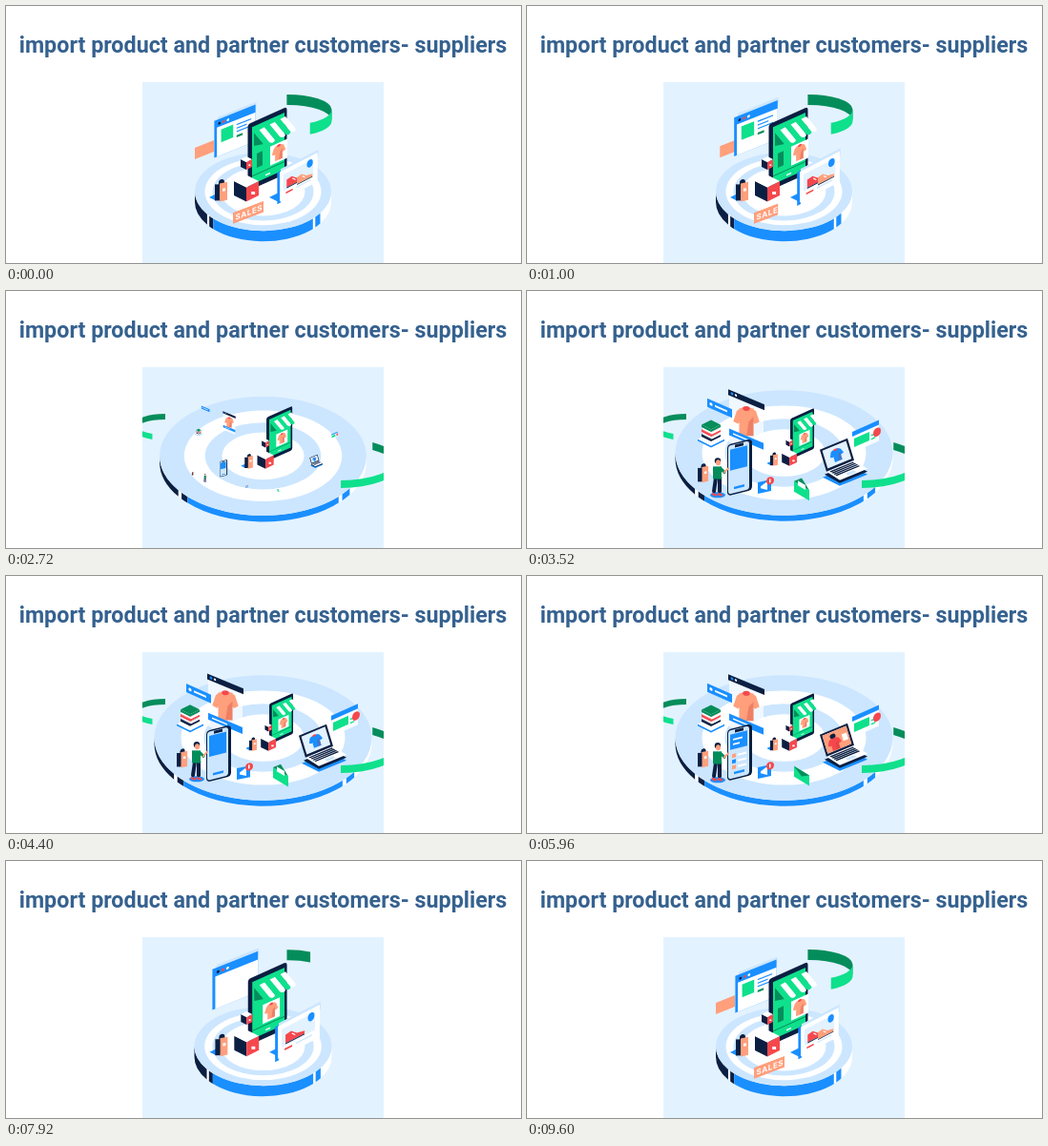
Animation of 540 by 270 pixels, one loop 9.64 s. Source, as an HTML page with a canvas:

```html
<!DOCTYPE html>
<html lang="en">
<head>
<meta charset="utf-8">
<style>
html, body { margin: 0; width: 540px; height: 270px; overflow: hidden; background: #fff; }
canvas { position: absolute; left: 0; top: 0; }
h1 { position: absolute; left: 0; top: 27px; width: 539px; margin: 0; text-align: center; white-space: nowrap;
  font: 700 23.3px/28px Roboto, sans-serif; color: #35618f; }
</style>
</head>
<body>
<canvas width="540" height="270"></canvas>
<h1>import product and partner customers- suppliers</h1>
<script>
const c = document.querySelector('canvas').getContext('2d');
const LOOP = 9640, RAD = Math.PI / 180;
const PALE = '#e3f2ff', RING = '#cce6ff', BLUE = '#1a8fff', NAVY = '#0b1f42', WHITE = '#fff',
  GREEN = '#0fe08c', DARK = '#048d5b', ORANGE = '#ff9f7c', RED = '#f5484d';
let t = 0;

const mix = (a, b, k) => a + (b - a) * k;
const part = (a, b) => Math.min(1, Math.max(0, (t - a) / (b - a)));
const ramp = (a, b) => {
  const k = part(a, b);
  return k < .5 ? 4 * k ** 3 : 1 - 4 * (1 - k) ** 3;
};
// Visible across the loop seam: appears late, leaves early
const seam = (inA, inB, outA, outB) => t < LOOP / 2 ? 1 - ramp(outA, outB) : ramp(inA, inB);
const bob = phase => Math.sin(t / LOOP * 8 * Math.PI + phase) * .7;

// Shapes
const rect = (color, x, y, w, h) => { c.fillStyle = color; c.fillRect(x, y, w, h); };
function round(color, w, h, r) {
  c.fillStyle = color;
  c.beginPath();
  c.roundRect(-w / 2, -h / 2, w, h, r);
  c.fill();
}
function poly(color, ...p) {
  c.fillStyle = color;
  c.beginPath();
  for (let i = 0; i < p.length; i += 2) c.lineTo(p[i], p[i + 1]);
  c.fill();
}
function oval(color, x, y, rx, ry = rx) {
  c.fillStyle = color;
  c.beginPath();
  c.ellipse(x, y, rx, ry, 0, 0, 7);
  c.fill();
}
function line(color, width, x1, y1, x2, y2) {
  c.strokeStyle = color;
  c.lineWidth = width;
  c.lineCap = 'round';
  c.beginPath();
  c.moveTo(x1, y1);
  c.lineTo(x2, y2);
  c.stroke();
}
function textRows(color, x, y, w, count, gap) {
  for (let i = 0; i < count; i++) rect(color, x, y + i * gap, w * (1 - i % 2 * .3), gap * .35);
}
// Vertical band along an elliptical arc, angles in degrees
function band(color, x, y, rx, ry, from, to, h) {
  if (to <= from) return;
  c.fillStyle = color;
  c.beginPath();
  c.ellipse(x, y, rx, ry, 0, from * RAD, to * RAD);
  c.ellipse(x, y + h, rx, ry, 0, to * RAD, from * RAD, true);
  c.fill();
}

// Spaces: a unit square spanned by two edges, and a sheared wall
function plane(x, y, ux, uy, vx, vy, draw) {
  c.save();
  c.transform(ux, uy, vx, vy, x, y);
  draw();
  c.restore();
}
const wall = (x, y, scale, slope, draw) => scale > .01 && plane(x, y, scale, scale * slope, 0, scale, draw);

function prism(x, y, w, h, top, left, right) {
  wall(x - w, y, 1, .5, () => rect(left, 0, 0, w, h));
  wall(x, y + w / 2, 1, -.5, () => rect(right, 0, 0, w, h));
  poly(top, x - w, y, x, y - w / 2, x + w, y, x, y + w / 2);
}
function tee(color, x, y, s) {
  wall(x, y, s, 0, () => {
    rect(color, -6, -11, 12, 23);
    for (const side of [-1, 1]) poly(color, side * 3, -12, side * 8, -9, side * 11, 0, side * 7, 2, 0, -6);
    poly('rgba(190,50,40,.28)', 2, 0, 6, -4, 6, 12, 0, 12);
    oval(RED, 0, -11, 3, 2);
  });
}
function shoe(color, x, y, s) {
  wall(x, y, s, 0, () => {
    poly(color, -10, -4, -4, -5, 2, 0, 10, 2, 10, 5, -10, 5);
    rect(NAVY, -10, 5, 20, 1);
    line(WHITE, 1, -3, -2, 0, 1);
  });
}
function crate(x, y, w, h) {
  prism(x, y, w, h, WHITE, NAVY, RED);
  rect(WHITE, x + w * .4, y + w * .5 + h * .3, w * .3, h * .2);
}
function bag(x, y, s) {
  wall(x, y, s, -.2, () => {
    round(NAVY, 6, 22, 3);
    rect(ORANGE, -2, -7, 8, 19);
    wall(-2, -7, 1, .2, () => rect(NAVY, -5, 1, 5, 17));
    rect(WHITE, 1, -1, 3, 3);
  });
}

function platform(z) {
  const cy = mix(195, 170, z), h = mix(11, 6, z), rx = mix(71.5, 114, z);
  const side = (color, a, b) => band(color, 269.5, cy, rx, rx * .577, a, b, h);
  side(WHITE, 0, 180);
  side(NAVY, 145, 180);
  side(NAVY, 137, 142);
  side(BLUE, 43, 137);
  side(BLUE, 33, 40);
  [rx, mix(61, 86, z), mix(53, 62, z), mix(44, 43, z)]
    .forEach((r, i) => oval(i % 2 ? WHITE : RING, 269.5, cy, r, r * .577));
}

function browser(size, shrink) {
  wall(240, 126 + 6 * shrink, size * (1 - .1 * shrink), -.4, () => {
    rect(RING, -20, -25, 45, 8);
    rect(BLUE, -24, -22, 48, 43);
    rect(WHITE, -21, -13, 45, 34);
    [NAVY, RED, WHITE].forEach((color, i) => oval(color, -18 + 5 * i, -17, 1.5));
    const k = seam(8050, 8600, 2000, 2400);
    rect(GREEN, -16, -9, 14 * k, 15 * k);
    textRows(BLUE, 2, -8, 17 * k, 3, 4);
    rect(DARK, 2, 5, 7 * k, 2.5);
  });
}

function shop() {
  const slide = seam(8050, 8600, 2000, 2400);
  wall(274, 150, 1, -.45, () => {
    round(NAVY, 41, 70, 3);
    rect(GREEN, -16, -30, 34, 60);
    rect(DARK, -16, 21, 34, 1);
    rect(WHITE, -2, 26, 5, 1.5);
    rect(DARK, -11, 0, 6 * slide, 15);
    wall(4 + 8 * slide, 9, 1, 0, () => {
      rect(WHITE, -9, -10, 18, 20);
      tee(ORANGE, 0, 0, .65);
    });
  });
  poly(DARK, 260, 133, 270, 145, 260, 147);
  plane(260, 133, 33, -17, 10, 12, () => {
    for (let i = 0; i < 6; i++) {
      const color = i % 2 ? WHITE : GREEN;
      rect(color, i / 6, 0, 1 / 6, 1);
      oval(color, (i + .5) / 6, 1, 1 / 12, .2);
    }
  });
}

function shoeCard(size, shrink) {
  wall(306, 180, size * (1 - .1 * shrink), -.52, () => {
    rect(RING, -20, -20, 44, 8);
    rect(BLUE, -24, -18, 4, 37);
    rect(WHITE, -21, -17, 44, 34);
    rect(PALE, -17, -12, 35, 19);
    oval(BLUE, 14, -9, 3.5, 4.5);
    const swap = t < LOOP / 2 ? ramp(900, 1500) : 0;
    shoe(RED, -3, 0, 1 - swap);
    shoe(ORANGE, 8, 3, .9 * mix(seam(7600, 8800, 2000, 2400), 1, swap));
    rect(RED, -14, 10, 8, 2);
    rect(RING, -2, 10, 17, 1.5);
  });
}

function curl() {
  const early = t < LOOP / 2;
  const head = mix(-92, 60, early ? 1 : ramp(7450, 8700));
  const tail = mix(-92, 60, early ? ramp(1300, 2480) : 0);
  band(DARK, 296, 109, 45.5, 16, tail, Math.min(head, 0), 11);
  band(GREEN, 296, 109, 45.5, 16, Math.max(tail, 0), head, 12);
}

function shopScene(z) {
  const size = seam(7150, 7750, 2000, 2550), shrink = seam(8150, 9300, 400, 1600);
  const flag = seam(8400, 9200, 700, 1500);
  c.save();
  c.translate(121.4 * z, 58.5 * z);
  c.scale(1 - .39 * z, 1 - .39 * z);
  wall(218, 141, 1, -.4, () => rect(ORANGE, -20 * flag, 0, 20 * flag, 12));
  browser(size, shrink);
  curl();
  shop();
  crate(252, 161, 6, 8);
  crate(252, 184, 13, 15);
  prism(220, 201, 7, 0, BLUE);
  bag(226, 193, 1);
  prism(285, 201, 9 * size, 0, BLUE);
  shoeCard(size, shrink);
  wall(238, 217, 1, -.38, () => {
    c.beginPath();
    c.rect(0, 0, 32 * flag, 12);
    c.clip();
    rect(ORANGE, 0, 0, 32, 12);
    c.fillStyle = WHITE;
    c.font = '700 8px Inter, sans-serif';
    c.letterSpacing = '.6px';
    c.fillText('SALES', 2.5, 9);
  });
  c.restore();
}

function edgeRibbons() {
  const k = ramp(2200, 2750) * (1 - ramp(6500, 7080));
  band(DARK, 167, 140, 32, 11, -90 - 90 * k, -90, 6);
  band(GREEN, 167, 140, 32, 11, 180 - 65 * k, 180, 6);
  band(DARK, 351, 177, 58, 22, -55 * k, 0, 8);
  band(GREEN, 351, 177, 58, 22, 0, 90 * k, 8);
}

// Things that pop up on the wide platform, each around its own centre
function teeCard() {
  rect('rgba(255,255,255,.7)', -18, -24, 36, 52);
  rect(NAVY, -19, -27, 38, 6);
  oval(BLUE, -15, -24, 1.4);
  oval(WHITE, -11, -24, 1.2);
  wall(0, -1, 1.25, -.4, () => tee(ORANGE, 0, 0, 1));
  rect(BLUE, -18, 14, 36, 7);
  rect(WHITE, -14, 17, 16, 1.5);
}
function label() {
  rect(BLUE, -13, -4, 26, 9);
  oval(WHITE, -9, .5, 1.6);
  rect(WHITE, -5, -.5, 13, 2);
}
function books() {
  prism(0, 6, 14, 2, WHITE, BLUE, BLUE);
  [NAVY, WHITE, RED, WHITE, DARK].forEach((color, i) => prism(i % 2, 1 - 2.5 * i, 10, 2.5, color, color, color));
}
function phone() {
  const rows = ramp(4550, 5150);
  round(NAVY, 26, 54, 4);
  wall(-1, 0, 1, 0, () => round(RING, 22, 51, 3));
  rect(BLUE, -10, -21, 18, mix(22, 16, rows));
  rect(NAVY, -5, -25, 9, 3);
  textRows(WHITE, -7, -16, 10 * rows, 2, 5);
  for (let i = 0; i < 3; i++) {
    rect(i % 2 ? BLUE : ORANGE, -8, 6 * i, 4 * rows, 4);
    rect(WHITE, -2, 1 + 6 * i, 9 * rows, 2);
  }
  rect(BLUE, -6, 19, 11, 2.5);
}
function person() {
  oval(BLUE, 0, 18, 8, 3);
  for (const side of [-1, 1]) {
    line(NAVY, 4, side * 2, 0, side * 3 - 1, 14);
    line(RED, 2.5, side * 3 - 2, 17, side * 3 + 1, 18);
  }
  round(DARK, 9, 2, 1);
  rect(DARK, -5, -12, 9, 13);
  line(DARK, 3, 3, -10, 7, -6);
  line(ORANGE, 2, 7, -6, 11, -10 + bob(0));
  oval(NAVY, 0, -18, 3.2);
  oval(ORANGE, .5, -16, 2.5, 3);
}
function promo() {
  rect(BLUE, -8, -5, 14, 12);
  poly(WHITE, -5, 0, 2, -4, 2, 5, -5, 2);
  oval(RED, 5, -4, 4);
  rect(WHITE, 4, -6, 1.5, 4);
}
function envelope() {
  const tip = mix(-13, 1, ramp(4700, 5300));
  rect(GREEN, -8, -5, 16, 11);
  poly(DARK, -8, -5, 0, tip, 8, -5);
  if (tip < -5) rect(WHITE, -4, tip + 5, 8, -tip - 8);
}
function laptop() {
  [BLUE, NAVY, WHITE].forEach((color, i) => {
    const grow = 2 - i;
    plane(-19 - 2 * grow, 11 + 3 * grow, 29, -12, 14 + 2 * grow, 9, () => rect(color, 0, 0, 1, 1));
  });
  plane(-19, 11, 29, -12, 14, 9, () => {
    for (let i = 0; i < 4; i++) rect(NAVY, .08, .08 + i * .14, .84, .1);
    rect(RING, .35, .7, .3, .22);
  });
  plane(-26, -12, 29, -12, 7, 23, () => {
    const swap = ramp(4800, 5400);
    rect(NAVY, 0, 0, 1, 1);
    rect(PALE, .07, .08, .86, .82);
    tee(BLUE, .5, .5, .022 * (1 - swap));
    rect(ORANGE, .07, .08, .86 * swap, .82);
    tee(RED, .4, .62, .022 * swap);
    oval(NAVY, .4, .27, .1 * swap);
    rect(WHITE, .7, .35, .18 * swap, .3);
  });
}
function offer() {
  rect('rgba(255,255,255,.85)', -14, -9, 28, 20);
  rect(BLUE, -14, -11, 28, 5);
  rect(GREEN, -12, -3, 16, 9);
  textRows(GREEN, 6, 1, 6, 2, 4);
  oval(RED, 12, 1, 4, 4.5);
}

const ITEMS = [
  [230, 138, .42, teeCard],
  [202, 123, .45, label],
  [223, 186, -.25, phone],
  [333, 179, 0, laptop],
  [193, 149, 0, books],
  [355, 152, -.45, offer],
  [200, 196, 0, person],
  [185, 191, 0, () => bag(0, 0, .85)],
  [250, 205, -.2, promo],
  [288, 210, .6, envelope]
];

function draw() {
  t = (performance.now() - start) % LOOP;
  const z = ramp(1960, 3080) * (1 - ramp(6960, 8080));
  c.clearRect(0, 0, 540, 270);
  c.save();
  c.beginPath();
  c.rect(143, 80, 253, 190);
  c.clip();
  rect(PALE, 143, 80, 253, 190);
  platform(z);
  edgeRibbons();
  shopScene(z);
  ITEMS.forEach(([x, y, slope, paint], i) => {
    const delay = 6 * i;
    const k = (1 - (1 - part(2640 + delay, 3240 + delay)) ** 3) * (1 - ramp(6650 + delay, 7150 + delay));
    wall(mix(269, x, mix(.84, 1, k)), y + bob(i), k, slope, paint);
  });
  c.restore();
  requestAnimationFrame(draw);
}
const start = performance.now();
draw();
</script>
</body>
</html>
```
